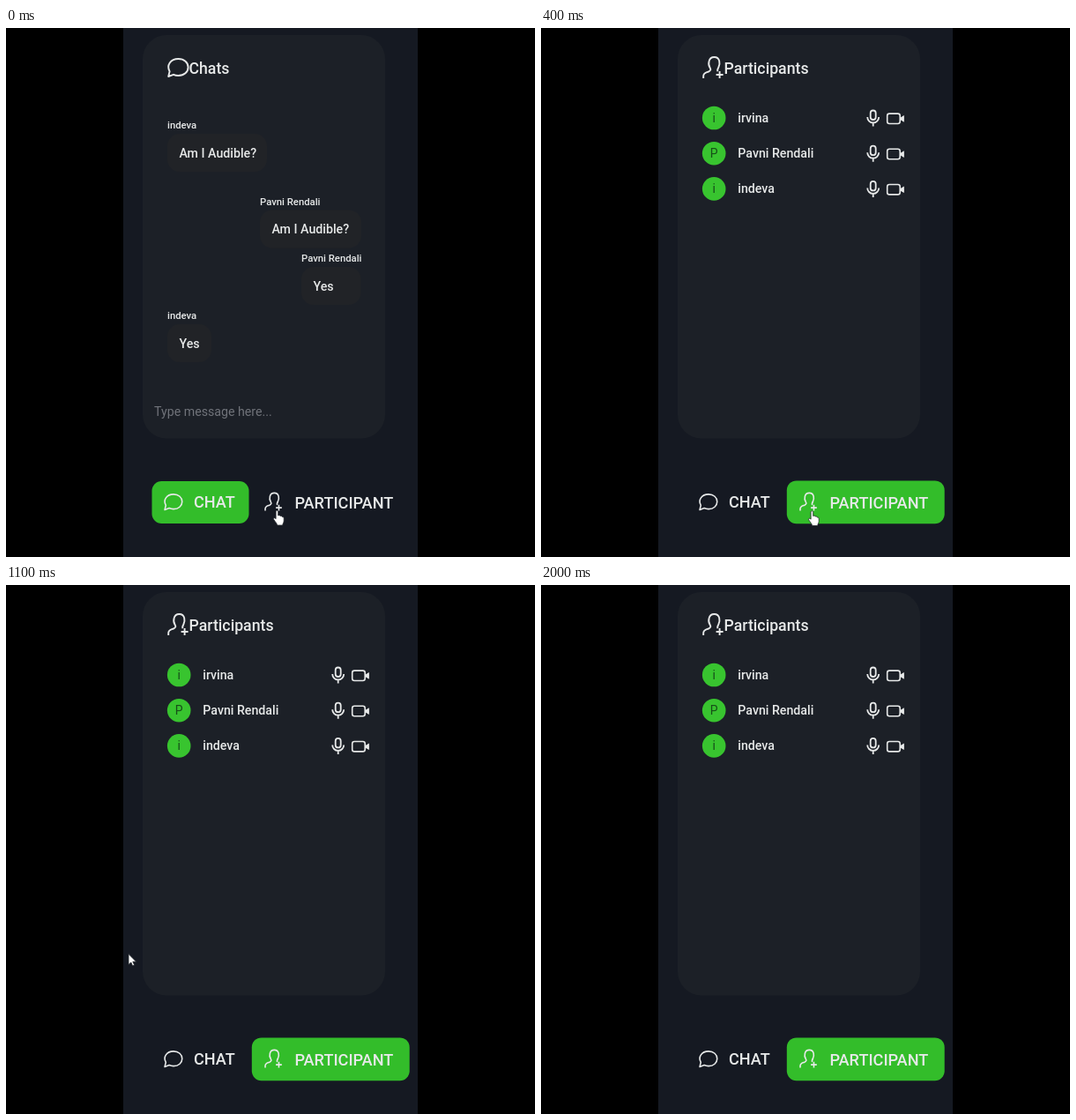
Animation, 600 px wide and 600 px high, one loop 2200 ms. Source, as an HTML page with a canvas:

```html
<!DOCTYPE html>
<html lang="en">
<head>
<meta charset="utf-8">
<title>Chat and participants</title>
<style>
html, body { margin: 0; width: 100%; height: 100%; overflow: hidden; background: #000; }
canvas { display: block; width: 600px; height: 600px; }
</style>
</head>
<body>
<canvas id="stage"></canvas>
<script>
const LOOP = 2200, STEP = 100;
const GREEN = '#33bd2a', INK = '#e7e9e9';
const canvas = document.getElementById('stage');
const ratio = window.devicePixelRatio || 1;
canvas.width = canvas.height = 600 * ratio;
const ctx = canvas.getContext('2d');

const messages = [
  { name: 'indeva', text: 'Am I Audible?', x: 183, y: 120, w: 113 },
  { name: 'Pavni Rendali', text: 'Am I Audible?', x: 288, y: 206.5, w: 115 },
  { name: 'Pavni Rendali', text: 'Yes', x: 335, y: 271, w: 67.5 },
  { name: 'indeva', text: 'Yes', x: 183, y: 336, w: 50 }
];
const people = ['irvina', 'Pavni Rendali', 'indeva'];

const shapes = {
  bubble: new Path2D('M1.2 21 L2.6 15.2 C-1.2 8.5 3.5 1 12.5 1 C19 1 23.6 5 23.6 10.5 C23.6 16 19 20 12.5 20 C10.4 20 8.6 19.6 7 18.8 Z'),
  person: new Path2D('M1.2 25 V22.5 C1.2 19 4 18.6 7 17.5 C10 16.3 9.6 14.6 8.6 13 C6.3 9.3 6.6 1 13.5 1 C20.4 1 20.2 9 18.4 12.5 C17 15 16.8 16.4 17.6 17.2 M15.6 21 H23.6 M19.6 17 V25'),
  mic: new Path2D('M-3 -5.5 A3 3 0 0 1 3 -5.5 V-1 A3 3 0 0 1 -3 -1 Z M-6.5 -1 A6.5 6.5 0 0 0 6.5 -1 M0 5.5 V9.5'),
  lens: new Path2D('M15 4.4 L19.2 2 V9.6 L15 7.2 Z'),
  hand: new Path2D('M3.1 9.7 V1.8 C3.1 -0.2 5.7 -0.2 5.7 1.8 V6 C7 5.3 8 5.8 8.2 6.6 C9.4 6.2 10.2 6.8 10.4 7.6 C11.8 7.4 12.2 8.2 12.2 9.4 V12 C12.2 14 10.8 14.8 10.8 17 H4.6 C4.4 14.8 2.2 13 0.7 10.4 C-0.2 8.8 1.6 8 3.1 9.7 Z'),
  arrow: new Path2D('M0 0 V12 L2.8 9.5 L4.6 13.5 L6.6 12.6 L4.8 8.7 H8.6 Z')
};

function box(x, y, w, h, r, color) {
  ctx.fillStyle = color;
  ctx.beginPath();
  ctx.roundRect(x, y, w, h, r);
  ctx.fill();
}

function label(text, x, y, size, color = INK, weight = 500, align = 'left') {
  ctx.font = `${weight} ${size}px Roboto, sans-serif`;
  ctx.fillStyle = color;
  ctx.textAlign = align;
  ctx.fillText(text, x, y);
}

function icon(path, x, y, scale = 1, width = 1.9) {
  ctx.save();
  ctx.translate(x, y);
  ctx.scale(scale, scale);
  ctx.strokeStyle = INK;
  ctx.lineWidth = width / scale;
  ctx.lineJoin = 'round';
  ctx.stroke(path);
  ctx.restore();
}

function drawChat() {
  icon(shapes.bubble, 183, 34);
  label('Chats', 207.5, 52, 17.7);
  for (const m of messages) {
    label(m.name, m.x, m.y - 6, 11.3);
    box(m.x, m.y, m.w, 43, 14, '#212327');
    label(m.text, m.x + 13.5, m.y + 26.5, 14.2);
  }
  label('Type message here...', 168, 439.5, 14.2, '#70737a', 400);
}

function drawCamera(x, y) {
  ctx.save();
  ctx.translate(x, y);
  ctx.strokeStyle = ctx.fillStyle = INK;
  ctx.lineWidth = 1.6;
  ctx.beginPath();
  ctx.roundRect(0, 0, 14.5, 11.4, 2.4);
  ctx.stroke();
  ctx.fill(shapes.lens);
  ctx.restore();
}

function drawPeople(loaded) {
  icon(shapes.person, 183, 32);
  label('Participants', 207.5, 52, 17.7);
  if (!loaded) return;
  people.forEach((name, i) => {
    const y = 102 + i * 40.2;
    box(182.9, y - 13.3, 26.6, 26.6, 13.3, '#38c42f');
    label(name[0], 196.2, y + 4.9, 14, '#174f19', 400, 'center');
    label(name, 223.3, y + 5, 14.2);
    icon(shapes.mic, 376.7, y, 1, 1.8);
    drawCamera(392.7, y - 4.9);
  });
}

function drawTabs(chatOpen) {
  if (chatOpen) box(165.5, 514, 110, 48, 11, GREEN);
  else box(278.8, 513.4, 178.9, 48.9, 11, GREEN);
  icon(shapes.bubble, 179, 528, 0.88, 1.6);
  label('CHAT', 213, 544.3, 18.1);
  icon(shapes.person, 293, 526.5, 0.84, 1.6);
  label('PARTICIPANT', 327.5, 545, 18.15);
}

function pointer(t) {
  if (t < 900) return { shape: 'hand', x: 303, y: t < 100 ? 547 : 547.5 };
  if (t < 1000) return { shape: 'hand', x: 259.5, y: 530 };
  if (t < 1100) return { shape: 'arrow', x: 201, y: 478 };
  if (t < 1500) return { shape: 'arrow', x: 139, y: 418.5 };
  return null;
}

function drawPointer(t) {
  const p = pointer(t);
  if (!p) return;
  ctx.save();
  ctx.translate(p.x, p.y);
  ctx.fillStyle = '#fff';
  ctx.strokeStyle = '#20242a';
  ctx.lineWidth = 0.8;
  ctx.fill(shapes[p.shape]);
  ctx.stroke(shapes[p.shape]);
  ctx.restore();
}

function draw(now) {
  const t = Math.floor(now % LOOP / STEP) * STEP;
  const chatOpen = t < 100;
  ctx.setTransform(ratio, 0, 0, ratio, 0, 0);
  box(0, 0, 600, 600, 0, '#000');
  box(133, 0, 334, 600, 0, '#151922');
  box(155, 8, 275, 457.5, 27, '#1c2027');
  if (chatOpen) drawChat();
  else drawPeople(t >= 200);
  drawTabs(chatOpen);
  drawPointer(t);
}

const start = performance.now();
function tick() {
  draw(performance.now() - start);
  requestAnimationFrame(tick);
}
tick();
</script>
</body>
</html>
```
